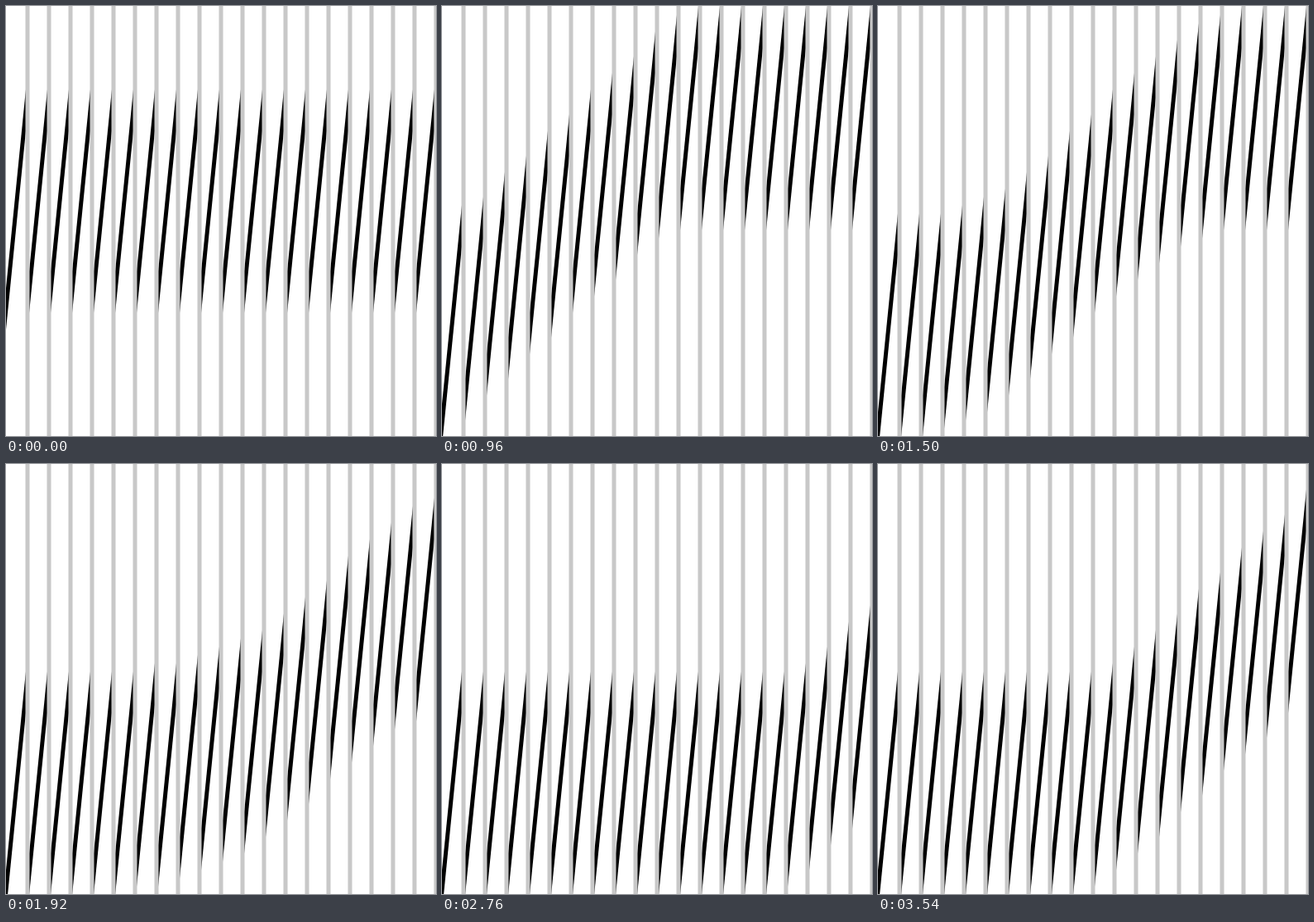
An HTML page with a canvas that plays this animation: 520 by 520 pixels, repeating every 3600 ms.

```html
<!DOCTYPE html>
<html lang="en">
<head>
<meta charset="utf-8">
<title>Slanted wave</title>
<style>
  html, body { margin: 0; width: 100%; height: 100%; overflow: hidden; background: #fff; }
  canvas { display: block; width: 520px; height: 520px; }
</style>
</head>
<body>
<canvas id="stage" width="520" height="520"></canvas>
<script>
const ctx = document.getElementById('stage').getContext('2d');
const SIZE = 520, CELL = 26, COUNT = SIZE / CELL, STROKE = 5;
const STEP = 60, STEPS = 60;
const SLOPE = 10, TOP = 6;
const HALF = STROKE / 2 * Math.hypot(1, SLOPE);
const START = 10, RAMP = 2.5, EASE = 0.2;

const clamp = (v, lo, hi) => Math.min(hi, Math.max(lo, v));

function smooth(from, to, s) {
  const u = clamp((s - from) / (to - from), 0, 1);
  return u * u * (3 - 2 * u);
}

// The front sweeps right, then swings halfway back.
const frontAt = s => -0.7 + 17.8 * smooth(6, 42, s) ** 1.5 - 8.6 * smooth(39, 60, s);

// Each column eases towards a ramp behind the front.
function nextPose(pose, step) {
  const front = frontAt(step);
  return pose.map((v, k) => {
    const goal = CELL - clamp(RAMP * (k - front), 0, CELL);
    return v + (goal - v) * EASE;
  });
}

function drawSlash(k, shift) {
  const x = k * CELL;
  const top = TOP + SLOPE * shift, bottom = top + SLOPE * CELL;
  ctx.beginPath();
  ctx.moveTo(x, bottom - HALF);
  ctx.lineTo(x + CELL, top - HALF);
  ctx.lineTo(x + CELL, top + HALF);
  ctx.lineTo(x, bottom + HALF);
  ctx.fill();
}

function draw(pose) {
  ctx.fillStyle = '#fff';
  ctx.fillRect(0, 0, SIZE, SIZE);
  ctx.fillStyle = '#000';
  pose.forEach((v, k) => drawSlash(k, Math.floor(v)));
  ctx.fillStyle = '#c8c8c8';
  for (let x = CELL; x <= SIZE; x += CELL) ctx.fillRect(x - STROKE / 2, 0, STROKE, SIZE);
}

const poses = [Array(COUNT).fill(START)];
for (let s = 1; s < STEPS; s++) poses.push(nextPose(poses[s - 1], s));

const begin = performance.now();

function tick() {
  const t = performance.now() - begin;
  draw(poses[Math.floor(t / STEP) % STEPS]);
  requestAnimationFrame(tick);
}
tick();
</script>
</body>
</html>
```
